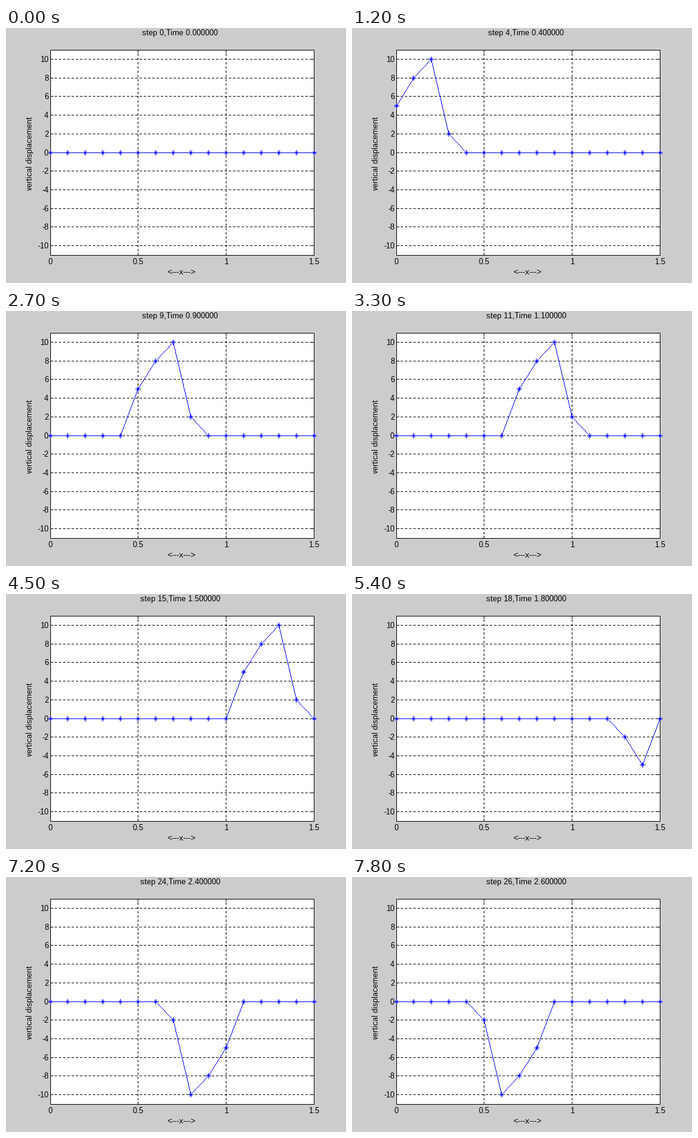
These frames come from a looping animation (560 by 420 pixels, 8 s). A matplotlib script:

```python
import math

import matplotlib.pyplot as plt
import numpy as np
from matplotlib.animation import FuncAnimation

W, H, DPI = 560, 420, 100
LEFT, RIGHT, TOP, BOTTOM = 73, 507, 36, 374
NODES = 16
PX = 72 / DPI
PULSE = {1: 2, 2: 10, 3: 8, 4: 5}
TICK = 4
DASH = (0, (4, 3))

plt.rcParams.update({
    "font.family": "Liberation Sans",
    "font.size": 13 * PX,
    "text.hinting": "native",
    "text.hinting_factor": 1,
    "text.kerning_factor": 6,
    "path.simplify": False,
})

fig = plt.figure(figsize=(W / DPI, H / DPI), dpi=DPI, facecolor="#cccccc")
ax = fig.add_axes([0, 0, 1, 1])
ax.set_xlim(0, W)
ax.set_ylim(H, 0)
ax.axis("off")


def px_x(x):
    return LEFT + math.floor((RIGHT - LEFT) * x / 1.5 + 1e-6)


def px_y(v):
    return math.floor((TOP + BOTTOM) / 2 - (BOTTOM - TOP) * v / 22 + 1e-6)


def stroke(xs, ys, color="black", **style):
    """One-pixel line without smoothing."""
    line, = ax.plot(xs, ys, color=color, lw=PX, antialiased=False, snap=False,
                    solid_capstyle="butt", dash_capstyle="butt",
                    clip_on=False, **style)
    return line


def label(x, y, text, ha="center", **style):
    return ax.text(x, y, text, ha=ha, va="baseline", **style)


ax.fill([LEFT, RIGHT + 1, RIGHT + 1, LEFT], [TOP, TOP, BOTTOM + 1, BOTTOM + 1],
        color="white", lw=0, antialiased=False)

for v in range(-10, 11, 2):
    y = px_y(v)
    stroke([LEFT, RIGHT + 1], [y + .5] * 2, linestyle=DASH)
    stroke([LEFT, LEFT + TICK + 1], [y + .5] * 2)
    stroke([RIGHT - TICK, RIGHT + 1], [y + .5] * 2)
    label(70, y + 5, str(v), ha="right")

for x, name in ((0, "0"), (.5, "0.5"), (1, "1"), (1.5, "1.5")):
    cx = px_x(x) + .5
    if 0 < x < 1.5:
        stroke([cx] * 2, [BOTTOM + 1, TOP], linestyle=DASH)
        stroke([cx] * 2, [TOP, TOP + TICK + 1])
        stroke([cx] * 2, [BOTTOM - TICK, BOTTOM + 1])
    label(cx, 389, name)

for y in (TOP, BOTTOM):
    stroke([LEFT, RIGHT + 1], [y + .5] * 2)
for x in (LEFT, RIGHT):
    stroke([x + .5] * 2, [TOP, BOTTOM + 1])

label(288.5, 406, "<---x--->")
label(43, 206.5, "vertical displacement", rotation=90, rotation_mode="anchor")
title = label(287, 12, "")
wave = stroke([], [], "#0000ff")

# Asterisk: a wide plus and a small cross.
STAR = np.array([(k * dx, k * dy)
                 for dx, dy, reach in ((1, 0, 4), (0, 1, 4), (1, 1, 2), (1, -1, 2))
                 for k in range(-reach, reach + 1)])


def trace(a, b):
    """Pixels of a thin stepped line from a to b."""
    steps = max(abs(b - a))
    return np.floor(np.linspace(a, b, steps + 1) + .5)


def displacement(step, j):
    """Pulse running right, plus its inverted echo from the fixed end."""
    return PULSE.get(step - j, 0) - PULSE.get(step - 2 * (NODES - 1) + j, 0)


def update(i):
    step = i // 3
    nodes = np.array([(px_x(j / 10), px_y(displacement(step, j)))
                      for j in range(NODES)])
    parts = [trace(a, b) for a, b in zip(nodes, nodes[1:])]
    parts += [node + STAR for node in nodes]
    x, y = np.unique(np.concatenate(parts), axis=0).T
    # Each pixel is a stroke one pixel long, followed by a gap.
    wave.set_data(np.column_stack([x, x + 1, x * np.nan]).ravel(),
                  np.repeat(y + .5, 3))
    title.set_text(f"step {step},Time {step / 10:.6f}")
    return wave, title


anim = FuncAnimation(fig, update, frames=80, interval=100, repeat=True,
                     repeat_delay=0, blit=False)
plt.show()
```
